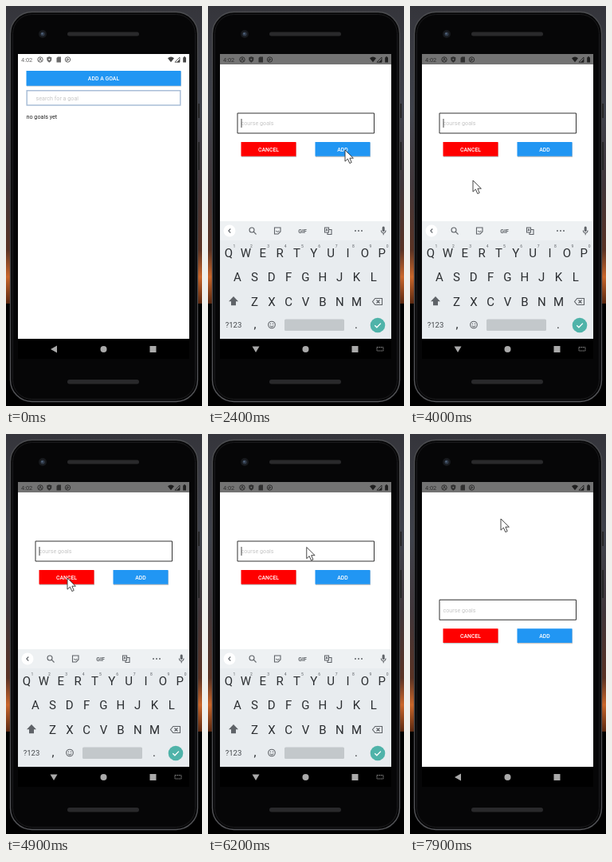
An HTML page that plays this animation: 246x500 px, repeating every 8 s.

```html
<!DOCTYPE html>
<html lang="en">
<head>
<meta charset="utf-8">
<title>Goal list</title>
<style>
html, body { margin: 0; width: 100%; height: 100%; overflow: hidden; background: #000; }
svg { display: block; width: 100%; height: 100%; font-family: Roboto, Arial, sans-serif; }
.mid { text-anchor: middle; }
.btn { font-size: 6.9px; font-weight: 500; fill: #fff; text-anchor: middle; }
.body { font-size: 7.2px; fill: #222; }
.hint { font-size: 7.2px; fill: #c6c6c6; }
.key { font-size: 15px; fill: #2b2e31; text-anchor: middle; }
.sup { font-size: 5px; fill: #5f6368; text-anchor: middle; }
.line { fill: none; stroke: #5f6368; stroke-width: 1.1; }
</style>
</head>
<body>
<svg viewBox="0 0 246 500">
  <defs>
    <linearGradient id="sky" x2="0" y2="1">
      <stop offset="0" stop-color="#35353b"/>
      <stop offset=".35" stop-color="#3f424b"/>
      <stop offset=".6" stop-color="#40363a"/>
      <stop offset=".82" stop-color="#5b3324"/>
      <stop offset=".91" stop-color="#c9662a"/>
      <stop offset="1" stop-color="#5a2810"/>
    </linearGradient>
    <linearGradient id="rim" x2="0" y2="1">
      <stop offset="0" stop-color="#4c4d50"/>
      <stop offset=".5" stop-color="#3a3a3d"/>
      <stop offset="1" stop-color="#55565a"/>
    </linearGradient>
    <clipPath id="screen"><path d="M15 60h215v381H15z"/></clipPath>
  </defs>

  <path d="M0 0h246v500H0z"/>
  <path d="M0 0h246v372H0z" fill="url(#sky)"/>
  <path d="M241 122h2v18h-2zM241 170h2v35h-2z" fill="#222"/>
  <rect x="5.5" y="7.5" width="235" height="487" rx="27" fill="#060607" stroke="url(#rim)" stroke-width="1.4"/>
  <rect x="8.5" y="10.5" width="229" height="481" rx="24" fill="none" stroke="#1b1b1d"/>
  <circle cx="46" cy="35" r="5" fill="#17191d"/>
  <circle cx="46" cy="35" r="2.6" fill="#303a49"/>
  <circle cx="45.4" cy="34.6" r="1" fill="#5d728c"/>
  <g fill="#29292b">
    <rect x="77" y="32.5" width="90" height="5" rx="2.5"/>
    <rect x="77" y="467" width="90" height="5.5" rx="2.7"/>
  </g>

  <g clip-path="url(#screen)">
    <path d="M15 60h215v356H15z" fill="#fff"/>
    <g id="status" fill="#6b6b6b"></g>
    <path d="M26 82h194v18.6H26z" fill="#000" opacity=".22"/>
    <path d="M25.5 81h194v18.7h-194z" fill="#2196f3"/>
    <path id="press" d="M80 82h113v17H80z" fill="#1a7fd4" opacity=".55"/>
    <text class="btn" x="122.5" y="93.2">ADD A GOAL</text>
    <path d="M26.2 105.7h192.6v18.4H26.2z" fill="#fff" stroke="#a9bed8" stroke-width="1.5"/>
    <text class="hint" x="37.5" y="117.6">search for a goal</text>
    <text id="empty" class="body" x="25.5" y="140.6">no goals yet</text>
    <g id="goals"></g>
    <path d="M15 416h215v25H15z"/>
    <g id="homeNav"></g>
    <path id="dim" d="M15 60h215v381H15z"/>

    <g id="modal">
      <path d="M15 73h215v368H15z" fill="#fff"/>
      <g id="form">
        <path d="M37 134h171.5v25H37z" fill="#fff" stroke="#333"/>
        <text id="hint" class="hint" x="41.5" y="149.4">course goals</text>
        <text id="typed" class="body" x="41.5" y="149.4"></text>
        <path id="caret" d="M0 141v11" stroke="#333" stroke-width=".9"/>
        <path d="M42 171h69v18H42zM135 171h69v18h-69z" opacity=".22"/>
        <path d="M41.5 170h69v17.8h-69z" fill="#f00"/>
        <path d="M134.5 170h69v17.8h-69z" fill="#2196f3"/>
        <text class="btn" x="76" y="181.6">CANCEL</text>
        <text class="btn" x="169" y="181.6">ADD</text>
      </g>
      <path d="M15 416h215v400H15z"/>
      <g id="modalNav"></g>
    </g>
    <g id="kb"></g>
  </g>
  <path id="cursor" d="M0 0V14.2L3.4 11.1 5.8 16.6 8.2 15.5 5.9 10.2H10.4Z" fill="#fff" stroke="#333" stroke-width=".9"/>
</svg>

<script>
const LOOP = 8000, STEP = 100, SLIDE = 330;
const $ = id => document.getElementById(id);
const set = (id, name, value) => $(id).setAttribute(name, value);
const show = (id, on) => set(id, 'display', on ? 'inline' : 'none');
const clamp = x => Math.max(0, Math.min(1, x));
const ramp = (t, start, span) => clamp((t - start) / span);
const ease = x => x * x * (3 - 2 * x);
const text = (cls, x, y, s, more = '') => `<text class="${cls}" x="${x}" y="${y}" ${more}>${s}</text>`;

// Each visit to the dialog: slide in, keyboard up, slide out.
const visits = [
  { open: 1250, kb: 1620, close: 2420 },
  { open: 2980, kb: 3340, close: 4960 },
  { open: 5480, kb: 5840, close: 6935 },
  { open: 7500, kb: 9e9, close: 9e9 }
];
const typing = [[2050, '1'], [2360, ''], [6250, '2'], [6400, '23'], [6900, '']];
// time, x, y of the pointer tip
const path = [
  [100, 245, 2], [300, 193, 88], [600, 190, 90], [1000, 119, 142], [1150, 112, 93],
  [1500, 112, 93], [2300, 172, 180], [2500, 172, 180], [2850, 108, 94], [3300, 106, 96],
  [4000, 79, 218], [4500, 77, 180], [5000, 77, 180], [5350, 98, 92], [5600, 98, 108],
  [6000, 110, 130], [6650, 171, 181], [7000, 171, 181], [7100, 165, 182], [7400, 112, 92],
  [7600, 112, 93], [7900, 114, 106]
];

function nav(down) {
  const back = down ? 'M55.5 425.5h9l-4.5 7.5z' : 'M64 424.5v9l-8-4.5z';
  const extra = down ? '<path d="M212 426.5h8v4.5h-8z" fill="none" stroke="#999" stroke-dasharray="1 .6"/>' : '';
  return `<g fill="#aaa"><path d="${back}M180.5 425h8v8h-8z"/><circle cx="122.5" cy="429" r="4"/>${extra}</g>`;
}

function statusIcons() {
  return text('', 19, 69.8, '4:02', 'font-size="7.4"') +
    `<g fill="none" stroke="#666"><circle cx="43" cy="67" r="3.2"/><circle cx="77.5" cy="67" r="3.2"/>
     <path d="M41.5 69l1.5-4 1.5 4M76 68.5l1-3 2 1.5z" stroke-width=".9"/></g>
     <path d="M51.3 64.2l3-1 3 1v3q-.5 2.5-3 3.6-2.5-1.1-3-3.6zM65 63.5h4v7h-5.5v-5.5z"/>
     <circle cx="54.3" cy="66.8" r="1" fill="#fff"/>
     <path d="M203 65.2q4-3.2 8 0l-4 5z" fill="#444"/>
     <path d="M218 64v6.2h-6z" fill="none" stroke="#555" stroke-width=".9"/>
     <path d="M218 66.5v3.7h-3.7zM222.2 64.2h1v-1h1.8v1h1v6.2h-3.8z" fill="#444"/>`;
}

function goal(label, i) {
  const y = 140.5 + i * 38.7;
  return `<g id="goal${i}"><rect x="25.5" y="${y}" width="194" height="31" rx="2" fill="#ccc"/>
    ${text('body', 36, y + 18, label)}
    <rect x="201" y="${y + 10}" width="9" height="11" rx="1" fill="#e9e9e9"/>
    ${text('body mid', 205.5, y + 18, 'X')}</g>`;
}

function keyboard() {
  const pitch = 21.35;
  const row = (keys, x, y) => [...keys].map((k, i) => text('key', x + i * pitch, y, k)).join('');
  const digits = [...'1234567890'].map((d, i) => text('sup', 33 + i * pitch, 302, d)).join('');
  return `<path d="M15 269h215v147H15z" fill="#e8ecef"/>
    <path d="M15 269h215v24H15z" fill="#eef1f3"/>
    <path d="M15 416h215v25H15z"/>${nav(true)}
    <circle cx="27" cy="281" r="7.5" fill="#fff"/>
    <g class="line">
      <path d="M28.3 278.5l-2.5 2.5 2.5 2.5"/>
      <circle cx="55" cy="280" r="3"/><path d="M57.2 282.2l3.3 3.3"/>
      <path d="M83.5 277h7.5v5l-3 3h-4.5zM85.3 281q2 2.5 4 0"/>
      <path d="M146.5 277h5v6h-5zM151.5 279.5h3.5v6h-5v-2.5M148 281l1-2 1 2"/>
      <path d="M217.3 280.5q.3 3.3 2.9 3.3t2.9-3.3M220.2 284v2.2"/>
      <circle cx="80" cy="398.5" r="4.3"/><path d="M77.8 399.5q2.2 2.8 4.4 0"/>
      <path d="M206.5 369.5l3.3-4h8.7v8h-8.7zM211.5 367.5l4 4m0-4l-4 4"/>
    </g>
    <g fill="#5f6368">
      <rect x="218.7" y="275.5" width="3" height="6.5" rx="1.5"/>
      <circle cx="185" cy="281" r="1"/><circle cx="189" cy="281" r="1"/><circle cx="193" cy="281" r="1"/>
      <circle cx="78.5" cy="397.2" r=".7"/><circle cx="81.5" cy="397.2" r=".7"/>
      <path d="M32 363l6 6.3h-3v5h-6v-5h-3z"/>
    </g>
    ${text('mid', 118.5, 283.5, 'GIF', 'font-size="7" font-weight="700" fill="#5f6368"')}
    ${row('QWERTYUIOP', 26, 314)}${digits}
    ${row('ASDFGHJKL', 37, 344)}${row('ZXCVBNM', 58.5, 375)}
    ${text('mid', 32, 402.3, '?123', 'font-size="9.5" fill="#44484c"')}
    ${text('key', 59, 402.5, ',')}${text('key', 186, 402.5, '.')}
    <rect x="96" y="391.5" width="75" height="14.5" rx="1.5" fill="#c3c8cb"/>
    <circle cx="213" cy="399" r="9.3" fill="#4fb3a9"/>
    <path d="M209.3 399.2l2.6 2.6 5-5.2" fill="none" stroke="#fff" stroke-width="1.3"/>`;
}

function pointer(t) {
  let i = 0;
  while (i < path.length - 2 && t >= path[i + 1][0]) i++;
  const [t0, x0, y0] = path[i], [t1, x1, y1] = path[i + 1];
  const k = ease(ramp(t, t0, t1 - t0));
  return [x0 + (x1 - x0) * k, y0 + (y1 - y0) * k];
}

function draw(t) {
  const v = visits.filter(s => s.open <= t).pop();
  const up = v ? ease(ramp(t, v.open, SLIDE)) * (1 - ease(ramp(t, v.close, SLIDE))) : 0;
  const kb = v ? ramp(t, v.kb, 200) * (1 - ramp(t, v.close + 105, 165)) : 0;
  const raised = v && t >= v.kb;

  show('modal', up > 0);
  set('modal', 'transform', `translate(0 ${(1 - up) * 368})`);
  set('form', 'transform', `translate(0 ${raised ? 0 : 73.3})`);
  set('dim', 'opacity', .55 * up);
  show('kb', kb > 0);
  set('kb', 'opacity', kb);
  set('kb', 'transform', `translate(0 ${(1 - kb) * 34})`);

  const last = typing.filter(e => e[0] <= t).pop();
  const typed = last ? last[1] : '';
  $('typed').textContent = typed;
  show('hint', !typed);
  show('caret', raised && t < v.close);
  set('caret', 'transform', `translate(${42 + typed.length * 4.1} 0)`);

  show('empty', t < visits[0].close);
  show('goal0', t >= visits[0].close);
  show('goal1', t >= visits[2].close);
  show('press', visits.some((s, i) => t >= s.open - (i ? 100 : 300) && t < s.open + 100));

  show('cursor', t >= 100);
  set('cursor', 'transform', `translate(${pointer(t)})`);
}

$('status').innerHTML = statusIcons();
$('goals').innerHTML = ['1', '23'].map(goal).join('');
$('homeNav').innerHTML = $('modalNav').innerHTML = nav(false);
$('kb').innerHTML = keyboard();

const begin = performance.now();
function tick() {
  const t = (performance.now() - begin) % LOOP;
  draw(Math.floor(t / STEP) * STEP);
  requestAnimationFrame(tick);
}
tick();
</script>
</body>
</html>
```
